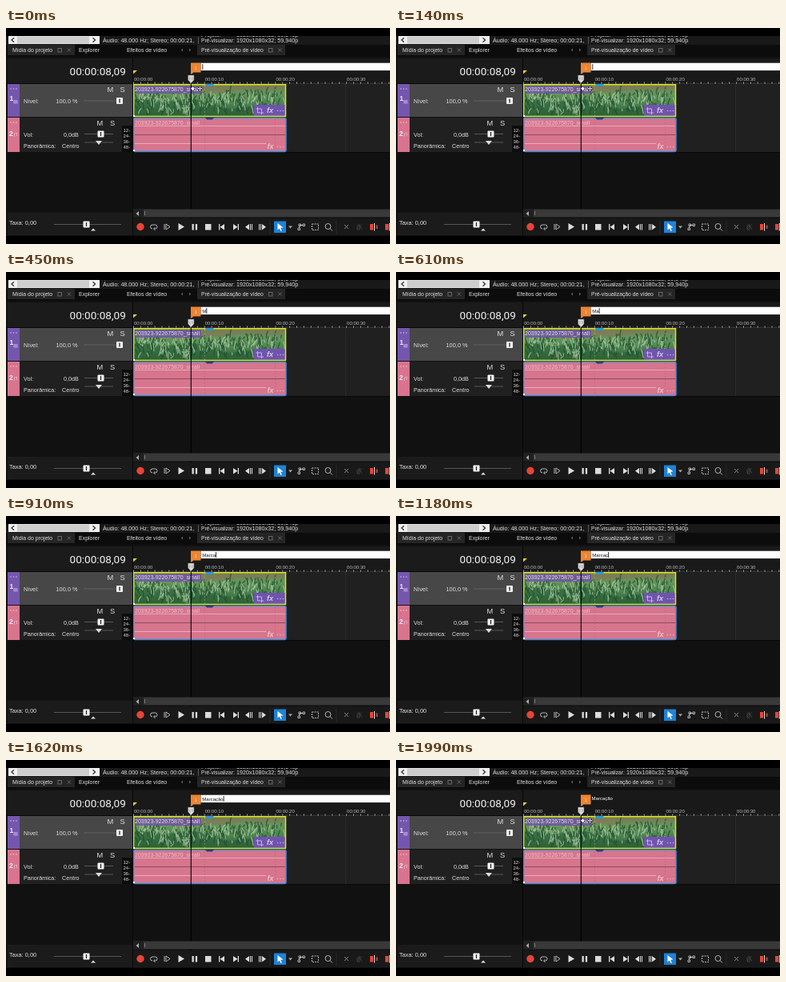
An HTML page for the animation above (2.01 s loop, 480 by 270 pixels).

```html
<!DOCTYPE html>
<html lang="pt">
<head>
<meta charset="utf-8">
<title>Timeline marker</title>
<style>
  html, body { margin: 0; width: 100%; height: 100%; overflow: hidden; background: #000; }
  svg { display: block; width: 100vw; height: 100vh; }
  text { font: 7.2px "Liberation Sans", Arial, sans-serif; fill: #dedede; white-space: pre; }
  .tab { font-size: 7px; }
  .ms { font-size: 9.3px; }
  .clock { font: 13.6px Roboto, sans-serif; fill: #f2f2f2; }
  .ruler { font-size: 6px; fill: #b9b9b9; }
  .db { font-size: 6px; fill: #ddd; }
  .num { font-size: 8.5px; font-weight: bold; fill: #f0eaf8; }
  .fx { font-size: 9px; font-style: italic; font-weight: bold; fill: #d6cbe9; }
  .mark { font-size: 6px; }
  .line { fill: none; stroke: #c4c4c4; stroke-width: .9; }
  .rail { stroke: #666; stroke-width: .8; }
  .icon { fill: #dcdcdc; }
</style>
</head>
<body>
<svg viewBox="0 0 480 270" preserveAspectRatio="none">
  <defs>
    <linearGradient id="field" x2="0" y2="1">
      <stop offset="0" stop-color="#66805a"/>
      <stop offset=".3" stop-color="#67965c"/>
      <stop offset=".6" stop-color="#4c8350"/>
      <stop offset="1" stop-color="#2f6239"/>
    </linearGradient>
    <pattern id="ticks" x="159" y="66" width="8.87" height="4" patternUnits="userSpaceOnUse">
      <path d="M.5 1.500V4" stroke="#d0d0d0" stroke-width=".8"/>
      <path d="M2.700 3V4M4.900 2.500V4M7.100 3V4" stroke="#8a8a8a" stroke-width=".7"/>
    </pattern>
    <clipPath id="clip"><rect x="161" y="72" width="188" height="38"/></clipPath>
    <g id="thumb">
      <rect x="-4" y="-4" width="8" height="8" rx="1" fill="#f4f4f4"/>
      <path d="M0-2.500V2.500" stroke="#222" stroke-width="1.300"/>
    </g>
    <g id="dots"><circle r=".8"/><circle cx="3.500" r=".8"/><circle cx="7" r=".8"/></g>
    <g id="tabicons" fill="none" stroke="#777" stroke-width=".8">
      <rect x="-2" y="-2" width="4.500" height="4.500"/>
      <path d="M9.800-2l4 4m0-4l-4 4"/>
    </g>
  </defs>

  <rect y="10" width="480" height="250" fill="#111"/>

  <!-- Info bar and tabs -->
  <rect y="10" width="480" height="11" fill="#191919"/>
  <rect x="3" y="10" width="114" height="10" fill="#f0f0f0"/>
  <rect x="14" y="10.500" width="90" height="9" fill="#cdcdcd"/>
  <path d="M10 12.300l-3 2.700 3 2.700M108.500 12.300l3 2.700-3 2.700" fill="none" stroke="#333" stroke-width="1.300"/>
  <text x="121" y="18.300">Áudio: 48.000 Hz; Stereo; 00:00:21,</text>
  <path d="M240.500 11V20" stroke="#666" stroke-width=".8"/>
  <text x="244" y="11.400">Projeto:</text>
  <text x="288" y="11.400">1920x1080x32; 59,940p</text>
  <text x="244" y="18.300" style="font-size:6.600px">Pré-visualizar:</text>
  <text x="288" y="18.300">1920x1080x32; 59,940p</text>

  <rect y="21" width="480" height="15" fill="#0c0c0c"/>
  <rect x="2" y="21" width="84" height="13" fill="#252525"/>
  <rect x="239" y="21" width="110" height="13" fill="#252525"/>
  <text class="tab" x="8" y="30">Mídia do projeto</text>
  <text class="tab" x="91" y="30">Explorer</text>
  <text class="tab" x="151" y="30">Efeitos de vídeo</text>
  <text class="tab" x="244" y="30" style="font-size:6.800px">Pré-visualização de vídeo</text>
  <use href="#tabicons" x="67" y="27.500"/>
  <use href="#tabicons" x="330.500" y="27.500"/>
  <path d="M221 25.500v4l-2.500-2zM229 25.500v4l2.500-2z" fill="#555"/>

  <!-- Track headers -->
  <rect x="2" y="38" width="156" height="31" fill="#1b1b1b"/>
  <text class="clock" x="79.500" y="59.300">00:00:08,09</text>

  <rect x="17" y="70" width="141" height="41" fill="#474747"/>
  <rect x="2" y="70" width="15" height="41" fill="#7457ad"/>
  <use href="#dots" x="6" y="76" fill="#c9bce4"/>
  <text class="num" x="4.500" y="90.500">1</text>
  <rect x="9.500" y="90" width="5" height="4.500" fill="#b3a0d8"/>
  <path d="M11 90v4.500m2-4.500v4.500" stroke="#7457ad" stroke-width=".5"/>
  <text class="ms" x="126.500" y="80">M</text>
  <text class="ms" x="142.500" y="80">S</text>
  <text x="22" y="93.500" style="font-size:7.400px">Nível:</text>
  <text x="62.500" y="93.500" style="font-size:7.400px">100,0 %</text>
  <path class="rail" d="M97 91H146"/>
  <use href="#thumb" x="142" y="91"/>

  <rect x="17" y="112" width="141" height="43" fill="#202020"/>
  <rect x="2" y="112" width="15" height="43" fill="#d8748e"/>
  <use href="#dots" x="6" y="118" fill="#f0c3cf"/>
  <text class="num" x="4" y="134.500">2</text>
  <path d="M10.500 136V132l3-1v4" fill="none" stroke="#eab4c2" stroke-width=".8"/>
  <text class="ms" x="113.500" y="122">M</text>
  <text class="ms" x="130" y="122">S</text>
  <text x="22" y="135.500">Vol:</text>
  <text x="72" y="135.500">0,0dB</text>
  <path class="rail" d="M98 132.500H134M98 143H134"/>
  <use href="#thumb" x="118.500" y="132.500"/>
  <text x="22" y="149.500">Panorâmica:</text>
  <text x="70" y="149.500">Centro</text>
  <path class="icon" d="M112 141h8l-4 5z"/>
  <rect x="145" y="122" width="13" height="33" fill="#0d0d0d"/>
  <g id="levels"></g>

  <!-- Timeline -->
  <rect x="159" y="38" width="321" height="31" fill="#191919"/>
  <rect x="159" y="70" width="321" height="85" fill="#202020"/>
  <path d="M424.500 70V155" stroke="#303030" stroke-width=".8"/>
  <path d="M159 155.500H480M0 69.500H480" stroke="#080808"/>
  <rect x="159" y="66" width="321" height="4" fill="url(#ticks)"/>
  <g id="times"></g>
  <path d="M159 53h5l-5 4.500z" fill="#e6d22c"/>

  <!-- Video clip -->
  <rect x="159" y="70" width="191" height="41" fill="url(#field)"/>
  <g clip-path="url(#clip)">
    <path d="M205 72H349V76C325 81 305 74 285 79S240 77 225 82S212 76 205 72z" fill="#8b7654" opacity=".55"/>
    <path d="M161 90C178 84 190 96 205 92S240 86 258 97S300 92 349 98V110H161z" fill="#2b6038" opacity=".55"/>
    <path id="dark" fill="none" stroke="#1f4f2e" stroke-width="1.500" opacity=".7"/>
    <path id="pale" fill="none" stroke="#b9d8ae" stroke-width="1.100" opacity=".7"/>
  </g>
  <path d="M248.500 72V110M336.500 72V110" stroke="#d6ddbd" stroke-width=".6" stroke-dasharray="2 2" opacity=".5"/>
  <rect x="161" y="72" width="83" height="10" fill="#7051aa" opacity=".78"/>
  <text class="tab" x="161" y="79.300">203923-922675870_small</text>
  <rect x="310" y="96" width="39" height="14" fill="#7053ae"/>
  <path class="line" d="M314.500 99V106H322M312.500 101H319.500V108" style="stroke:#cabde3"/>
  <text class="fx" x="326" y="106.300">fx</text>
  <use href="#dots" x="339.500" y="103.500" fill="#bfb0dd"/>
  <rect x="159.500" y="70.750" width="190" height="39.700" fill="none" stroke="#dbe61a" stroke-width="1.500"/>
  <path d="M249 70h11l-2 3h-7z" fill="#2b96d8"/>

  <!-- Audio clip -->
  <rect x="159.500" y="112.500" width="190.500" height="42" rx="2" fill="#d7758d" stroke="#3790e0" stroke-width="1.500"/>
  <path d="M248.500 114V154M336.500 114V154" stroke="#bf6279" stroke-width=".6" stroke-dasharray="2 2"/>
  <path d="M161 122.500H349" stroke="#e4b4c4" stroke-width=".8"/>
  <path d="M161 133.500H349" stroke="#80495a" stroke-width=".9"/>
  <path d="M161 144.500H325" stroke="#ebbcc8" stroke-width=".8"/>
  <text class="tab" x="161" y="121" style="fill:#f0bfcb">203923-922675870_small</text>
  <path d="M249 112h11l-2 2.500h-7z" fill="#203d98"/>
  <text class="fx" x="326.500" y="151.300" style="fill:#efc2cd">fx</text>
  <use href="#dots" x="339.500" y="148.500" fill="#eab0bf"/>
  <g fill="#fff">
    <rect x="159" y="109" width="2" height="2"/>
    <rect x="159" y="152" width="2" height="2"/>
  </g>

  <!-- Playhead and marker -->
  <path d="M231.300 69V238" stroke="#000" stroke-width="1.100"/>
  <path d="M227.500 59h7.500v6l-3.700 4-3.800-4z" fill="#dcdcdc" stroke="#555" stroke-width=".5"/>
  <path d="M229.800 61v4m3-4v4" stroke="#777" stroke-width=".6"/>
  <path d="M231 43.500h12.500v12h-9l-2.500 2h-1z" fill="#ee8432"/>
  <text x="235.500" y="51.500" style="font-size:6px;fill:#ffe0c0">1</text>
  <g id="edit">
    <rect x="243.600" y="43.700" width="240" height="9.400" fill="#fff"/>
    <text id="typed" class="mark" x="245.300" y="50.600" style="fill:#111"></text>
    <path id="caret" d="M0 45V52" stroke="#000" stroke-width=".8"/>
  </g>
  <text id="label" class="mark" x="244.500" y="50.300" style="fill:#fff">Marcação</text>
  <g id="pointer" fill="#fff" stroke="#111" stroke-width=".7">
    <path d="M233.500 72.800l2.700 3-2.700 3-2.700-3z"/>
    <path d="M242.500 72l1.700 2.400h-1v.7h.7v-1l2.400 1.700-2.400 1.700v-1h-.7v.7h1l-1.700 2.400-1.700-2.400h1v-.7h-.7v1l-2.400-1.700 2.400-1.700v1h.7v-.7h-1z"/>
  </g>

  <!-- Rate, scrollbar and transport -->
  <rect x="2" y="231" width="156" height="28" fill="#1b1b1b"/>
  <text x="4" y="246.300" style="font-size:7.400px">Taxa: 0,00</text>
  <path class="rail" d="M60 245.500H144"/>
  <use href="#thumb" x="100.500" y="245.500"/>
  <path class="icon" d="M106 253.500h6l-3-3z"/>
  <path d="M158.500 36V260" stroke="#080808"/>
  <rect x="159" y="226" width="321" height="11" fill="#202020"/>
  <rect x="172" y="227" width="308" height="9" fill="#393939"/>
  <path d="M166 229v6l-3.500-3z" fill="#aaa"/>
  <path d="M173.500 229v5" stroke="#777"/>
  <rect x="159" y="238" width="321" height="21" fill="#191919"/>
  <circle cx="168" cy="248.500" r="4.700" fill="#e84437"/>
  <path class="line" d="M183 251q-2.500 0-2.500-2.500t2.500-2.500h3.500q2.500 0 2.500 2.500t-2.500 2.500h-1.500m1.500-1.800l-2 1.800 2 1.800M198 245v7"/>
  <path class="line" d="M200 245l5 3.500-5 3.500z"/>
  <path class="icon" d="M215.500 244l7.500 4.500-7.500 4.500zM232.500 245h2.300v7.500h-2.300zM236.800 245h2.300v7.500h-2.300zM249 245h7.500v7.500h-7.500z"/>
  <path class="icon" d="M266 245h1.300v7.500h-1.300zM273 245v7.500l-5.500-3.700zM284 245l5.500 3.800-5.500 3.700zM289.700 245h1.300v7.500h-1.300z"/>
  <path class="icon" d="M304 245v7.500l-5-3.700zM305 245h1v7.500h-1zM307 245h1v7.500h-1zM316 245h1v7.500h-1zM318 245h1v7.500h-1zM320 245l5 3.800-5 3.700z"/>
  <path d="M330 241V257M413 241V257" stroke="#2b2b2b"/>
  <rect x="335" y="241.500" width="15" height="14.500" fill="#1d83d8"/>
  <path d="M339.500 244l7 5.500-3.400.3 1.800 3.500-1.400.7-1.800-3.600-2.200 2z" fill="#fff"/>
  <path d="M353 247.500h5l-2.500 3z" fill="#aaa"/>
  <path class="line" d="M366.500 250l1-3.500h4M365 250h2.500v2.500h-2.500zM366 245h2.500v2.500h-2.500zM371 245h2.500v2.500h-2.500z"/>
  <rect class="line" x="382.500" y="245" width="8" height="7.500" stroke-dasharray="2 1"/>
  <path class="line" d="M405 250.500l3 3"/>
  <circle class="line" cx="402.500" cy="248" r="3.500"/>
  <path d="M423 246l5 5m0-5l-5 5" stroke="#8a8a8a"/>
  <path class="line" d="M439 251l5.500-5.500M441 245l4 6.500M439 247h3v5h-3z" style="stroke:#444"/>
  <g fill="#e6463b">
    <path d="M455 245h4v7.500h-4zM474 245h4v7.500h-4z"/>
    <path d="M460.500 244v9.500M479.300 244v9.500" stroke="#e4e4e4"/>
    <path d="M462 246.500h3v4.500h-3z" fill="#8d3732"/>
  </g>
  <path d="M0 0H480V10H0zM0 260H480V270H0z"/>
</svg>
<script>
  const LOOP = 2010, COMMIT = 1850, WORD = 'Marcação';
  const KEYS = [410, 530, 680, 780, 880, 1080, 1300, 1460];
  const $ = id => document.getElementById(id);
  const show = (id, on) => $(id).setAttribute('visibility', on ? 'visible' : 'hidden');

  function addText(parent, cls, x, y, value) {
    const el = document.createElementNS('http://www.w3.org/2000/svg', 'text');
    el.setAttribute('class', cls);
    el.setAttribute('x', x);
    el.setAttribute('y', y);
    el.textContent = value;
    $(parent).append(el);
  }
  [12, 24, 36, 48].forEach((v, i) => addText('levels', 'db', 146.5, 129.7 + i * 7.2, v + '-'));
  [0, 10, 20, 30].forEach(s =>
    addText('times', 'ruler', 160 + s * 8.87, 66, '00:00:' + String(s).padStart(2, '0')));

  // Loose grass blades over the field
  let seed = 11;
  const rand = () => (seed = seed * 16807 % 2147483647) / 2147483647;
  function blades(id, count, top, reach) {
    let d = '';
    for (let i = 0; i < count; i++) {
      const x = 161 + rand() * 188, y = top + rand() * (110 - top), h = 3 + rand() * reach;
      d += `M${x} ${y}q${rand() * 3 - 1.5} ${-h / 2} ${rand() * 8 - 4} ${-h}`;
    }
    $(id).setAttribute('d', d);
  }
  blades('dark', 150, 82, 10);
  blades('pale', 120, 86, 9);

  function draw(now) {
    const t = now % LOOP;
    const count = KEYS.filter(k => k <= t).length;
    const editing = t < COMMIT;
    const typed = $('typed');
    typed.textContent = WORD.slice(0, count);
    const end = count ? typed.getComputedTextLength() : 0;
    $('caret').setAttribute('transform', `translate(${245.8 + end} 0)`);
    show('edit', editing);
    show('caret', editing && (t < 250 || count > 0));
    show('label', !editing);
    show('pointer', !editing || !count);
  }
  const start = performance.now();
  function tick() {
    draw(performance.now() - start);
    requestAnimationFrame(tick);
  }
  tick();
</script>
</body>
</html>
```
